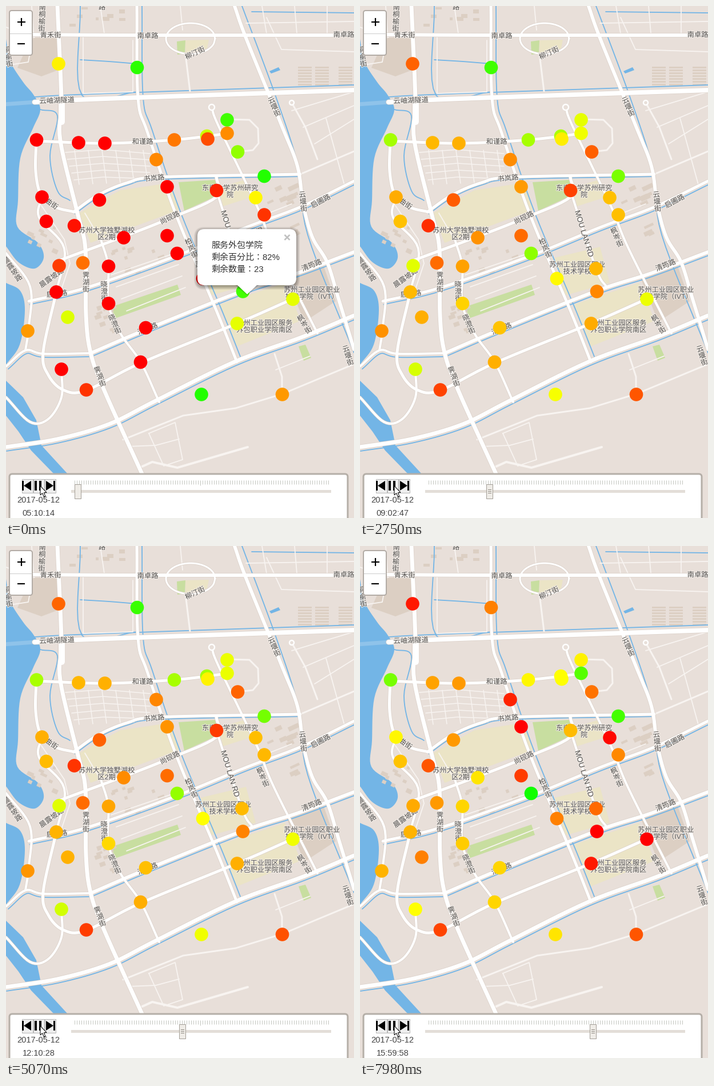
Animation of 609x895 px, one loop 8 s. Source, as a matplotlib script:

```python
import colorsys
import math
import random

import numpy as np
import matplotlib.pyplot as plt
from matplotlib.animation import FuncAnimation
from matplotlib.patches import Circle, FancyBboxPatch, Polygon, Rectangle
from matplotlib.patheffects import withStroke

W, H, DPI = 609, 895, 64
PT = 72 / DPI  # points per pixel
LAND, WATER, SCHOOL = "#e8dfd9", "#73b5e6", "#ebe4c6"
GREEN, SHADE, EDGE, INK = "#c8dea0", "#dccfc3", "#dbd0c8", "#5a5856"
FONTS = ["Liberation Sans", "Noto Sans CJK JP"]

random.seed(4)
fig = plt.figure(figsize=(W / DPI, H / DPI), dpi=DPI, facecolor=LAND)


def stage():
    a = fig.add_axes([0, 0, 1, 1])
    a.set_xlim(0, W)
    a.set_ylim(H, 0)
    a.axis("off")
    return a


ax = stage()


def pairs(c):
    return np.array(c, float).reshape(-1, 2)


def smooth(p, n=8):
    """Catmull-Rom curve through the points."""
    q = np.vstack([2 * p[0] - p[1], p, 2 * p[-1] - p[-2]])
    t = np.linspace(0, 1, n, endpoint=False)[:, None]
    out = []
    for a, b, c, d in zip(q, q[1:], q[2:], q[3:]):
        out.append(b + 0.5 * t * (c - a + t * (2 * a - 5 * b + 4 * c - d
                                               + t * (3 * (b - c) + d - a))))
    return np.vstack(out + [p[-1:]])


def beside(p, d):
    """The curve moved sideways by d."""
    g = np.gradient(p, axis=0)
    g /= np.hypot(*g.T)[:, None]
    return p + d * np.column_stack([-g[:, 1], g[:, 0]])


def line(color, w, p, z):
    ax.plot(p[:, 0], p[:, 1], color=color, lw=w * PT, zorder=z,
            solid_capstyle="round", solid_joinstyle="round")


def road(w, *c, ditch=0):
    p = smooth(pairs(c))
    line(EDGE, w + 1.4, p, 4)
    line("white", w, p, 5)
    if ditch:
        line(WATER, 1.8, beside(p, ditch), 3)


def lane(*c, w=1.8):
    line("#f8f4f1", w, pairs(c), 3.5)


def canal(*c):
    line(WATER, 1.8, smooth(pairs(c)), 3)


def area(color, *c, curved=False):
    p = pairs(c)
    ax.add_patch(Polygon(smooth(p) if curved else p, fc=color, ec="none", zorder=2))


def blocks(x, y, w, h, n, tilt, lo=5, hi=12):
    for _ in range(n):
        ax.add_patch(Rectangle((x + random.random() * w, y + random.random() * h),
                               random.uniform(lo, hi), random.uniform(4, 8),
                               angle=tilt, fc=SHADE, ec="none", zorder=2.5))


def text(x, y, s, size, color=INK, z=8, **kw):
    return ax.text(x, y, s, fontsize=size * PT, color=color, zorder=z,
                   family=FONTS, **kw)


def label(s, x, y, angle=0, size=12.3):
    """Street name along a direction; steep ones stack their characters."""
    halo = [withStroke(linewidth=2.2 * PT, foreground="#f6f1ecd0")]
    kw = dict(ha="center", va="center", path_effects=halo)
    if angle > -50 or s.isascii():
        text(x, y, s, size, rotation=angle, **kw)
        return
    a = math.radians(angle)
    for i, ch in enumerate(s):
        d = (i - (len(s) - 1) / 2) * size
        text(x + d * math.cos(a), y - d * math.sin(a), ch, size,
             rotation=angle + 90, **kw)


def box(x, y, w, h, r, **kw):
    p = FancyBboxPatch((x + r, y + r), w - 2 * r, h - 2 * r,
                       boxstyle=f"round,pad={r},rounding_size={r}", **kw)
    return ax.add_patch(p)


def draw_areas():
    area(WATER, 0, 58, 7, 96, 30, 133, 48, 155, 60, 181, 47, 214, 25, 266, 21, 340,
         20, 386, 56, 414, 66, 440, 50, 459, 22, 448, 0, 420, curved=True)
    area(WATER, 0, 484, 25, 498, 33, 532, 24, 592, 0, 627, curved=True)
    area(WATER, 0, 655, 30, 684, 53, 724, 62, 768, 108, 818, 84, 818,
         44, 777, 22, 744, 0, 716)
    area(WATER, 461, 114, 477, 107, 480, 112, 464, 118)
    area(SHADE, 44, 55, 90, 56, 91, 112, 62, 123, 20, 108)
    area(SCHOOL, 128, 362, 200, 322, 288, 309, 304, 356, 148, 414)
    area(GREEN, 302, 308, 366, 304, 373, 330, 312, 358)
    area(SCHOOL, 372, 318, 420, 303, 430, 334, 380, 350)
    area(SCHOOL, 341, 440, 420, 421, 437, 484, 358, 506)
    area(SCHOOL, 374, 522, 488, 484, 516, 550, 404, 595)
    area(SHADE, 492, 478, 556, 455, 577, 516, 522, 552)
    area(GREEN, 184, 526, 300, 487, 306, 505, 191, 546)
    area(GREEN, 512, 595, 524, 592, 534, 615, 521, 620)
    area(GREEN, 299, 62, 314, 60, 313, 83, 300, 85)
    area(SCHOOL, 314, 60, 355, 59, 352, 74, 314, 83)
    for y in range(106, 138, 5):
        for x in (511, 541, 582):
            ax.add_patch(Rectangle((x, y), 24, 3, fc=SHADE, zorder=2.5))
    blocks(152, 520, 35, 55, 12, -20)
    blocks(38, 380, 50, 45, 9, 25)
    blocks(180, 420, 110, 45, 12, -20)
    blocks(445, 315, 50, 32, 8, -25, 10, 20)
    blocks(480, 385, 25, 20, 3, -25, 10, 18)
    blocks(110, 2, 100, 35, 8, 0)


def draw_canals():
    canal(130, 0, 133, 156, 229, 150)
    canal(130, 94, 180, 97, 229, 101)
    canal(60, 181, 90, 192, 77, 262, 90, 323, 112, 340)
    canal(413, 0, 472, 158, 514, 290, 528, 400, 609, 606)
    canal(430, 10, 609, 12)


def draw_lanes():
    # Housing blocks, terraces and the grid by the highway
    for i in range(5):
        lane(103 + 4 * i, 256 + 12 * i, 170, 251 + 12 * i, 252, 258 + 11 * i, w=1.5)
    for i in range(6):
        lane(120 + 24 * i, 252, 128 + 24 * i, 312 - i, w=1.5)
    for i in range(4):
        lane(184 + 9 * i, 470 + 21 * i, 296 + 6 * i, 432 + 20 * i)
    for i in range(3):
        lane(500 + 20 * i, 183 + 29 * i, 609, 150 + 24 * i)
        lane(448 + 57 * i, 0, 456 + 53 * i, 48)
    lane(135, 55, 135, 153, 222, 150, 222, 60)
    lane(0, 37, 50, 55)
    lane(45, 0, 48, 48, 39, 98, 0, 104)
    lane(165, 0, 172, 48)
    lane(305, 0, 309, 42)
    lane(314, 84, 322, 149, w=3)
    lane(456, 20, 482, 76, 609, 80)
    lane(420, 30, 609, 27)
    lane(500, 169, 524, 212, 545, 268, w=3)
    lane(515, 294, 609, 254, w=3)
    lane(560, 196, 592, 312)
    lane(388, 198, 426, 199, 441, 214, 442, 240, 432, 252, 405, 255, w=3)
    lane(138, 362, 170, 416)
    lane(60, 346, 102, 408, 112, 450, 96, 498)
    lane(452, 365, 500, 346)
    lane(470, 608, 483, 648, 483, 679, w=3)
    lane(472, 636, 532, 612)
    lane(205, 758, 310, 716, 402, 703, 484, 678, 609, 626, w=3)
    lane(250, 747, 296, 728, 309, 793, 276, 804, 250, 747)
    lane(213, 770, 262, 768, 303, 757)
    lane(236, 806, 256, 797, 300, 807, 423, 771, w=4)


def draw_roads():
    t = np.radians(np.arange(0, 361, 24))
    loop = np.column_stack([323 + 43 * np.cos(t), 57 + 27 * np.sin(t)])
    road(3, *loop.ravel())
    road(5, 53, 234, 52, 290, 62, 332, 88, 352, 120, 360)
    road(4, 63, 334, 58, 370, 102, 424, 88, 500)
    road(4, 0, 432, 42, 490, 40, 560, 34, 602)
    road(4, 0, 630, 34, 602, 66, 608, 148, 607, ditch=6)
    road(4, 0, 684, 42, 727, 74, 722, 97, 684, 97, 636)
    road(5, 88, 500, 65, 605, 74, 645, 100, 671, 140, 672, 236, 624, 404, 555, 502, 512)
    road(5, 40, 516, 142, 492, 300, 436, 420, 387, 516, 351, 609, 306, ditch=6)
    road(5, 90, 446, 206, 403, 282, 373, 368, 334, 368, 298)
    road(4, 166, 408, 179, 455, 179, 520, 200, 572, 236, 623, 268, 692)
    road(4, 360, 178, 372, 210, 437, 345, 470, 424, 545, 572)
    road(4, 368, 322, 413, 459, 432, 492)
    road(5, 229, 0, 231, 161, 248, 222, 298, 366, 368, 532, 404, 622, ditch=-9)
    road(5, 53, 236, 173, 240, 294, 234, 387, 223)
    road(5, 118, 360, 160, 331, 212, 309, 270, 299, 515, 294, ditch=4)
    road(6, 42, 50, 230, 51, 609, 51)
    road(6, 400, 0, 420, 56, 482, 208, 510, 280, 520, 346, 536, 404, 562, 448,
         582, 512, 609, 600)
    road(6, 148, 607, 244, 566, 414, 498, 510, 467, 609, 430, ditch=6)
    road(7, 0, 771, 90, 757, 180, 731, 262, 690, 400, 622, 520, 578, 609, 541, ditch=7)
    road(7, 90, 0, 97, 165, 95, 235, 126, 366, 139, 425, 140, 540, 148, 606,
         172, 672, 240, 822)
    road(8, 50, 168, 100, 165, 230, 160, 609, 147, ditch=-9)
    line("#8fc3ea", 7, pairs((-5, 172, 50, 168)), 3)
    road(11, 97, 165, 97, 202)
    for x, y, r in ((360, 177, 5), (500, 169, 4)):
        ax.add_patch(Circle((x, y), r, fc=LAND, ec="white", lw=2.4 * PT, zorder=6))


def draw_labels():
    label("青禾街", 78, 52)
    label("南卓路", 248, 53)
    label("南卓路", 591, 51)
    label("柳汀街", 331, 83, 25)
    label("云岫湖隧道", 89, 166, 2)
    label("和谨路", 239, 238)
    label("书岚路", 259, 302, 6)
    label("尚砚路", 287, 371, 26)
    label("启圃路", 551, 342, 28)
    label("启圃路", 89, 504, 6)
    label("清筠路", 535, 454, 22)
    label("清筠路", 248, 565, 22)
    label("晨露坡路", 80, 476, 36)
    label("晨露坡路", 12, 461, -55)
    label("禾曲街", 74, 343, -35)
    label("云堰街", 470, 177, -66)
    label("云堰街", 520, 343, -84)
    label("云堰街", 599, 612, -72)
    label("柏岚街", 325, 424, -65)
    label("枫岑街", 450, 405, -66)
    label("枫岑街", 523, 557, -58)
    label("晓澄街", 172, 500, -88)
    label("晓澄街", 191, 557, -66)
    label("霁湖街", 140, 484, -90)
    label("霁湖街", 165, 649, -70)
    label("南桐榆街", 63, 22, -92)
    label("桐榆街", 4, 90, -78)
    label("路", 168, 3)
    label("MOU LAN RD", 392, 398, -73, 13.5)
    for x, y, a, b in ((392, 319, "东南大学苏州研究", "院"),
                       (176, 393, "苏州大学独墅湖校", "区2期"),
                       (380, 453, "苏州工业园区职业", "技术学校"),
                       (535, 497, "苏州工业园区职业", "技术学院（IVT）"),
                       (452, 555, "苏州工业园区服务", "外包职业学院南区")):
        label(a, x, y)
        label(b, x, y + 12)


def draw_controls():
    box(6, 8, 40, 78, 4, fc="white", ec="#b3aca6", lw=2 * PT, zorder=9)
    ax.plot([7, 45], [47.5, 47.5], color="#cccccc", lw=PT, zorder=10)
    for x, y in (([19.5, 33.5], [28, 28]), ([26.5, 26.5], [21, 35]), ([20, 33], [66, 66])):
        ax.plot(x, y, color="black", lw=2.2 * PT, zorder=10, solid_capstyle="butt")

    box(6, 818, 592, 95, 5, fc="white", ec="#b5afa8", lw=3 * PT, zorder=9)
    for x in (27, 47, 67):
        ax.add_patch(Rectangle((x + .5, 826.5), 19, 24, fc="#efefef", ec="#b8b8b8",
                               lw=PT, zorder=10))
    for x, w in ((28, 3), (50, 4), (58, 4), (83, 3)):
        ax.add_patch(Rectangle((x, 830), w, 17, fc="black", zorder=11))
    for x, tip in ((44, 31), (70, 83)):
        ax.add_patch(Polygon([(x, 830), (x, 847), (tip, 838.5)], fc="black", zorder=11))
    arrow = pairs((60, 839, 60, 855, 63.6, 851.6, 66.4, 858, 69, 857, 66.3, 850.8, 71, 850.4))
    ax.add_patch(Polygon(arrow, fc="white", ec="black", lw=PT, zorder=12))

    text(57, 868, "2017-05-12", 14.6, "#444444", 10, ha="center")
    for x in np.round(np.linspace(119, 563, 112)) + .5:
        end = 838 if abs(x - 341) < 2 else 836
        ax.plot([x, x], [829, end], color="#c4c7c0", lw=PT, zorder=10,
                solid_capstyle="butt")
    ax.add_patch(Rectangle((114, 846), 455, 5, fc="#e3ded8", zorder=10))


for part in (draw_areas, draw_canals, draw_lanes, draw_roads, draw_labels, draw_controls):
    part()

# Flatten the still parts once, so each frame only draws what changes.
fig.canvas.draw()
still = np.array(fig.canvas.buffer_rgba())
ax.remove()
fig.figimage(still, zorder=-1)
ax = stage()

LAST = 104  # steps in one loop
stations = []


def station(x, y, day, dawn=0, dusk=None):
    """A bike stand and its hue (0 empty, 120 full) at dawn, by day and at dusk."""
    dusk = day if dusk is None else dusk
    stations.append((x, y, (dawn, day, day, dusk), random.uniform(0, math.tau)))


def hue(step, levels, phase):
    base = np.interp(step, [0, 25, 82, LAST], levels)
    sway = 6 * math.sin(math.pi * step / LAST) * math.sin(step / 5 + phase)
    return min(118, max(0, base + sway))


station(92, 101, 28, 57, 6)
station(229.5, 107.5, 106, 110, 30)
station(387, 199, 68, 105, 57)
station(351.5, 227.5, 78, 72, 60)
station(387, 222.5, 60, 33, 100)
station(353, 232.5, 60, 18)
station(53.5, 234, 78, dusk=92)
station(127, 239, 38)
station(173, 240, 36)
station(294.5, 234, 86, 28, 58)
station(263, 268.5, 32, 32, 8)
station(405.5, 255, 27, 86)
station(452, 297.5, 94, 112, 104)
station(282, 316, 36, dusk=0)
station(368.5, 322.5, 18, 8, 44)
station(437, 335, 40, 58, 2)
station(452, 365, 44, 12, 32)
station(63, 334, 36, dusk=58)
station(163.5, 339, 20, dusk=36)
station(70.5, 376.5, 46)
station(119.5, 384, 13, 4, 20)
station(206, 405, 36, dusk=54)
station(282, 401.5, 20, dusk=14)
station(299.5, 432.5, 86, dusk=116)
station(93, 454, 62, 14, 40)
station(134.5, 449, 20, 26, 36)
station(179.5, 455, 42, dusk=50)
station(344.5, 476.5, 58, dusk=30)
station(413, 459, 48, 50, 25)
station(88, 500, 42)
station(414.5, 499, 36, 104, 0)
station(502, 512.5, 60, 66, 0)
station(179.5, 520, 48)
station(108, 544, 46, 68, 30)
station(38, 568, 38, 36, 42)
station(244.5, 562.5, 50)
station(404.5, 555, 44, 66, 6)
station(235.5, 622.5, 36, dusk=50)
station(97, 635, 66, dusk=60)
station(140.5, 671, 16, 12)
station(342, 679, 62, 112, 54)
station(483.5, 679, 23, 36, 20)

sx, sy = np.array([s[:2] for s in stations]).T
dots = ax.scatter(sx, sy, s=(23.6 * PT) ** 2, linewidths=0, zorder=2)

popup = []
for g in range(7):
    popup.append(box(335 - g, 392 - g, 173 + 2 * g, 98 + 2 * g, 12 + g,
                     fc=(0, 0, 0, .05), ec="none", zorder=3))
popup.append(box(335, 390, 173, 98, 12, fc="white", ec="none", zorder=4))
for wide, tip, color, z in ((22, 506, (0, 0, 0, .15), 3), (18, 504, "white", 4)):
    popup.append(ax.add_patch(Polygon([(422 - wide, 487), (422 + wide, 487), (422, tip)],
                                      fc=color, zorder=z)))
for i, s in enumerate(("服务外包学院", "剩余百分比：82%", "剩余数量：23")):
    popup.append(text(359, 423 + 21 * i, s, 15, "#333333", 5))
for s in (1, -1):
    popup += ax.plot([487.5, 496.5], [404.5 - 4.5 * s, 404.5 + 4.5 * s],
                     color="#c0c0c0", lw=2.6 * PT, zorder=5, solid_capstyle="butt")

clock = text(57, 891, "", 14.6, "#444444", 5, ha="center")
handle = ax.add_patch(Rectangle((0, 835.5), 11, 25, fc="#efece7", ec="#a39e97",
                                lw=PT, zorder=4))
ridges = [ax.plot([], [], color="#8f8a83", lw=PT, zorder=5)[0] for _ in range(3)]


def update(i):
    ms = i * 40 + 30
    step = max(0, math.floor((ms - 70) / 76.8 + .2) + 1)
    # Seconds of the day; playback slows a little towards the end.
    sec = int(round(np.interp(step, [0, 25, 36, 54, 66, 82, LAST],
                              [18614, 28222, 32567, 39360, 43828, 49764, 57598])))
    clock.set_text(f"{sec // 3600:02d}:{sec // 60 % 60:02d}:{sec % 60:02d}")
    dots.set_facecolors([colorsys.hsv_to_rgb(hue(step, *s[2:]) / 360, 1, 1)
                         for s in stations])
    x = round(125 + (sec - 18614) * .00724)
    handle.set_x(x - 5.5)
    for n, r in enumerate(ridges):
        r.set_data([x - 2.5, x + 3], [844.5 + 3 * n] * 2)
        r.set_visible(step > 0)
    for p in popup:
        p.set_visible(step == 0)
    return []


anim = FuncAnimation(fig, update, frames=200, interval=40, repeat=True,
                     init_func=lambda: update(0), cache_frame_data=False)
plt.show()
```
